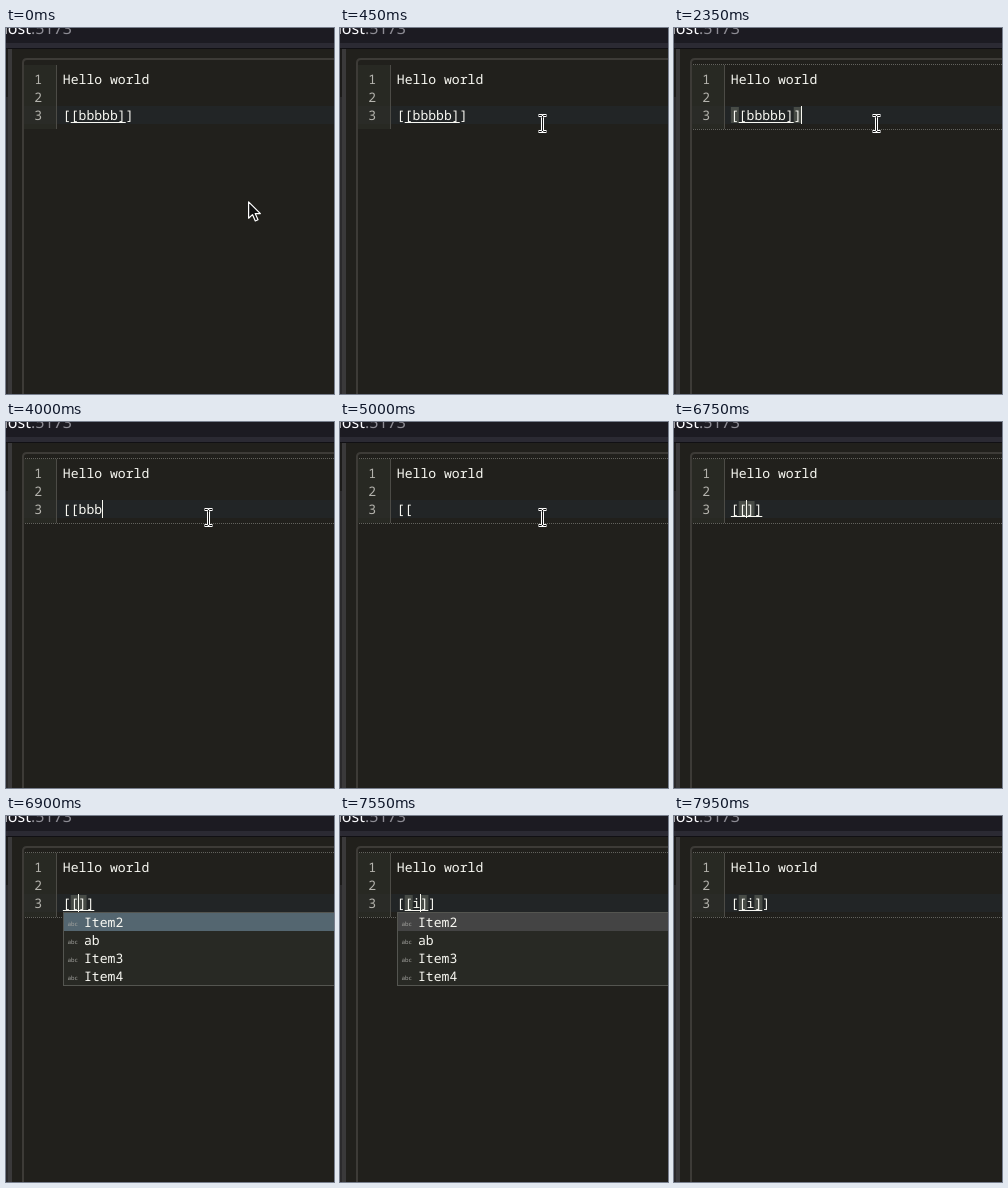
Recreate the animation shown at these times as an HTML page. Size 328 by 366 pixels, loop 8000 ms.

```html
<!DOCTYPE html>
<html lang="en">
<head>
<meta charset="utf-8">
<title>Editor</title>
<style>
  html, body { margin: 0; width: 100%; height: 100%; overflow: hidden; background: #21201c; }
  svg { display: block; width: 328px; height: 366px; }
  text { white-space: pre; text-rendering: geometricPrecision; }
  .code { font: 13.1px "Noto Sans Mono", "DejaVu Sans Mono", monospace; fill: #f8f8f2; }
  .num { fill: #b4b3ad; text-anchor: end; }
  .url { font: 16px "Noto Sans", sans-serif; fill: #fbfbfe; }
  .icon { font: 5.9px "Noto Sans Mono", "DejaVu Sans Mono", monospace; fill: #a3a39f; }
</style>
</head>
<body>
<svg viewBox="0 0 328 366">
  <rect width="328" height="366" fill="#21201c"/>
  <rect width="328" height="16" fill="#1c1b22"/>
  <rect y="15" width="328" height="5" fill="#2b2a33"/>
  <rect y="20" width="328" height="1" fill="#111014"/>
  <text class="url" x="25" y="6" text-anchor="end">host</text>
  <text class="url" x="25" y="6" style="fill:#8d8c94">:5173</text>
  <rect y="21" width="2" height="48" fill="#1c1b1a"/>
  <rect y="69" width="2" height="297" fill="#2b2a2c"/>
  <rect x="2" y="21" width="4" height="345" fill="#3a393a"/>

  <path d="M17 366V35q0-4 4-4H328" fill="none" stroke="#3d3b37" stroke-width="2"/>
  <rect x="18" y="37" width="32" height="64" fill="#282923"/>
  <rect x="18" y="78" width="32" height="18" fill="#2a2b27"/>
  <rect x="51" y="78" width="277" height="18" fill="#222526"/>
  <rect x="50" y="37" width="1" height="64" fill="#4c4b46"/>
  <g id="focus" stroke="#62625d" stroke-dasharray="1 1">
    <path d="M19 36.5H328M19 101.5H328"/>
  </g>
  <g class="code">
    <text class="num" x="36" y="56">1</text>
    <text class="num" x="36" y="74">2</text>
    <text class="num" x="36" y="92">3</text>
    <text x="56.85" y="56">Hello world</text>
  </g>

  <g id="marks" fill="#474b46"></g>
  <text id="line" class="code" x="56.85" y="92"></text>
  <rect id="under" y="94" height="1" fill="#f8f8f2"/>
  <rect id="caret" y="78" width="1" height="18" fill="#f8f8f0"/>

  <g id="popup">
    <rect x="57.5" y="96.5" width="280" height="73" fill="#282924" stroke="#545550"/>
    <rect id="pick" x="58" y="97" width="270" height="18"/>
  </g>

  <path id="arrow" d="M.6 .8V17.2L4.5 13.6L7.3 20L10 18.8L7.2 12.6H12.4Z" fill="#111" stroke="#fff" stroke-width="1.2" stroke-linejoin="round"/>
  <g id="beam" fill="none">
    <path d="M.5 1.5H3.2L4.5 2.5L5.8 1.5H8.5M4.5 2V17M.5 17.5H3.2L4.5 16.5L5.8 17.5H8.5" stroke="#fff" stroke-width="3"/>
    <path d="M1 1.5H3.4L4.5 2.6L5.6 1.5H8M4.5 2V17M1 17.5H3.4L4.5 16.4L5.6 17.5H8" stroke="#111"/>
  </g>
</svg>
<script>
const LOOP = 8000, LEFT = 56.85, CHAR = 7.86;
const el = id => document.getElementById(id);
const svgNode = (tag, attrs, parent) => {
  const node = document.createElementNS("http://www.w3.org/2000/svg", tag);
  for (const key in attrs) node.setAttribute(key, attrs[key]);
  return parent.appendChild(node);
};
const show = (id, on) => el(id).setAttribute("visibility", on ? "visible" : "hidden");
const column = n => Math.floor(LEFT + CHAR * n);

// time, text, caret column (-1 = hidden), highlighted columns, underlined range
const steps = [
  [0, "[[bbbbb]]", -1, [], [1, 8]],
  [2350, "[[bbbbb]]", 9, [0, 8], [1, 8]],
  [2850, "[[bbbbb]]", -1, [0, 8], [1, 8]],
  [3000, "[[bbbbb]]", 8, [1, 7], [1, 8]],
  [3600, "[[bbbbb]", 7, [1, 7], [1, 8]],
  [3650, "[[bbbbb", 7, [], null],
  [3800, "[[bbbb", 6, [], null],
  [4000, "[[bbb", 5, [], null],
  [4150, "[[bb", 4, [], null],
  [4300, "[[b", 3, [], null],
  [4500, "[[", 2, [], null],
  [5000, "[[", -1, [], null],
  [5300, "[", 1, [], null],
  [5550, "", 0, [], null],
  [6150, "", -1, [], null],
  [6600, "[]", 1, [0, 1], null],
  [6750, "[[]]", 2, [1, 2], [0, 4]],
  [7450, "[[i]]", 3, [1, 3], [1, 4]],
  [7950, "[[i]]", -1, [1, 3], [1, 4]]
];

["Item2", "ab", "Item3", "Item4"].forEach((label, i) => {
  const y = 111 + 18 * i;
  svgNode("text", { class: "icon", x: 61.5, y: y - 1 }, el("popup")).textContent = "abc";
  svgNode("text", { class: "code", x: 78, y }, el("popup")).textContent = label;
});
const marks = [0, 1].map(() => svgNode("rect", { y: 79, width: 8, height: 16 }, el("marks")));

function drawLine(t) {
  const [, text, caret, lit, under] = steps.findLast(step => step[0] <= t);
  el("line").textContent = text;
  el("caret").setAttribute("x", column(Math.max(caret, 0)));
  show("caret", caret >= 0);
  marks.forEach((mark, i) => {
    mark.setAttribute("x", LEFT + CHAR * (lit[i] ?? 0));
    mark.setAttribute("visibility", lit.length ? "visible" : "hidden");
  });
  show("under", under);
  if (under) {
    el("under").setAttribute("x", LEFT + CHAR * under[0]);
    el("under").setAttribute("width", CHAR * (under[1] - under[0]));
  }
}

function drawPointer(t) {
  // moves in 50 ms ticks, easing in and out
  const p = Math.min(Math.max((Math.floor(t / 50) - 1) / 8, 0), 1);
  const k = p * p * (3 - 2 * p);
  const x = Math.round(242 - 40 * k), y = Math.round(173 - 78 * k);
  const overText = y <= 101;
  el("arrow").setAttribute("transform", `translate(${x} ${y})`);
  el("beam").setAttribute("transform", `translate(${x - 4} ${y - 9})`);
  show("arrow", !overText);
  show("beam", overText && t < 6400);
}

function frame(now) {
  const t = now % LOOP;
  drawLine(t);
  drawPointer(t);
  show("focus", t >= 2350);
  show("popup", t >= 6900 && t < 7650);
  el("pick").setAttribute("fill", t < 7550 ? "#546670" : "#444444");
  requestAnimationFrame(frame);
}
frame(0);
const start = performance.now();
requestAnimationFrame(function begin() {
  frame(performance.now() - start);
});
</script>
</body>
</html>
```
